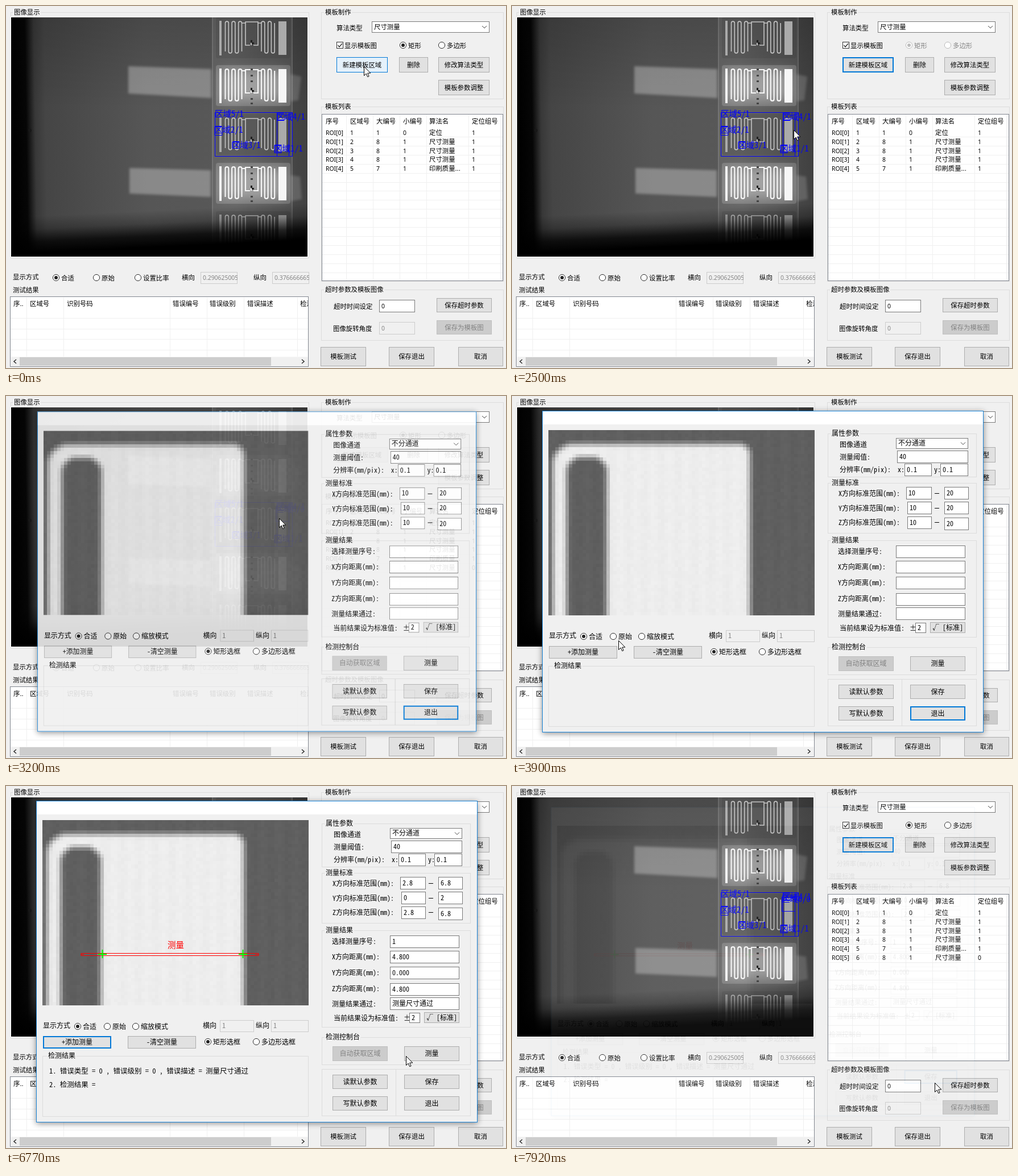
An HTML page with a canvas that plays this animation: 879 by 637 pixels, repeating every 8 s.

```html
<!DOCTYPE html>
<html lang="zh-CN">
<head>
<meta charset="utf-8">
<title>模板制作</title>
<style>
html, body { margin: 0; width: 100%; height: 100%; overflow: hidden; background: #f0f0f0; }
div, svg.layer, canvas { position: absolute; left: 0; top: 0; }
div, svg.layer { width: 879px; height: 637px; }
text { white-space: pre; }
#main text { font: 11.4px "Noto Sans", "Noto Sans CJK SC", "Noto Sans CJK", sans-serif; }
#main text.n { font-size: 10.4px; }
#dialog text, #main text.roi { font: 12px "Noto Sans Mono CJK SC", "Noto Sans CJK SC", "Noto Sans CJK", monospace; }
#main text.roi, #dialog text.big { font-size: 14.5px; }
#dialog text.log { font-size: 12.5px; }
#dialog { transform-origin: 441px 309px; }
#frame { left: 53px; top: 26px; width: 776px; height: 566px; background: #f0f0f0; box-shadow: 0 2px 10px rgba(0,0,0,.45); }
#photo { left: 9px; top: 20px; }
#zoom { left: 64px; top: 60px; width: 468px; height: 326px; image-rendering: pixelated; }
.group { fill: none; stroke: #dcdcdc; }
.b { fill: #e1e1e1; stroke: #adadad; }
.b.off { fill: #ccc; stroke: #bfbfbf; }
.b.hot { fill: #e5f1fb; stroke: #0078d7; }
.b.down { fill: #cce4f7; stroke: #005499; }
/* The button's own viewport clips this to two inner pixels. */
.b.focus { stroke: #0078d7; stroke-width: 3; }
.gray text, text.gray { fill: #838383; }
.ring { fill: #fff; stroke: #333; }
.gray .ring { stroke: #bcbcbc; }
.dot { fill: #222; }
.gray .dot { fill: #bcbcbc; }
.roi { fill: #00f; }
.box { fill: none; stroke: #00f; }
.grid { fill: none; stroke: #f0f0f0; }
.mark { fill: none; stroke: red; }
</style>
</head>
<body>
<div id="main"><canvas id="photo" width="521" height="421"></canvas><svg class="layer"></svg></div>
<div id="dialog"><div id="frame"></div><canvas id="zoom" width="78" height="54"></canvas><svg class="layer"></svg></div>
<svg class="layer"><path id="cursor" d="M0 0V16L3.7 12.5 6.2 18.2 8.6 17.2 6.2 11.6H11.3Z" fill="#fff" stroke="#000"/></svg>
<script>
const $ = id => document.getElementById(id);

// Markup helpers; text is placed by its vertical centre.
const text = (x, cy, s, cls = '', extra = '') =>
  `<text x="${x}" y="${cy + 4.2}" class="${cls}" ${extra}>${s}</text>`;
const rect = (x, y, w, h, attr) =>
  `<rect x="${x + .5}" y="${y + .5}" width="${w - 1}" height="${h - 1}" ${attr}/>`;
const path = (d, attr) => `<path d="${d}" ${attr}/>`;
const part = (id, body) => `<g id="${id}">${body}</g>`;
const view = (x, y, w, h, body) => `<svg x="${x}" y="${y}" width="${w}" height="${h}">${body}</svg>`;

function group(x, y, w, h, label = '', lx = x + 7, unit = 12) {
  const gap = label ? `M${lx - 2} ${y + .5}h${label.length * unit + 4}` : '';
  return rect(x, y, w, h, 'class="group"') +
    (label ? path(gap, 'stroke="#f0f0f0" stroke-width="3"') + text(lx, y, label) : '');
}
function button(x, y, w, h, label, id = '', off = false) {
  return view(x, y, w, h, rect(0, 0, w, h, `class="b ${off ? 'off' : ''}" id="${id}"`) +
    text(w / 2, h / 2, label, off ? 'gray' : '', 'text-anchor="middle"'));
}
function field(x, y, w, h, before = '', after = before, off = false) {
  const cls = off ? 'gray n' : 'n';
  const body = before === after ? text(4, h / 2 - .5, before, cls)
    : text(4, h / 2 - .5, before, cls + ' before') + text(4, h / 2 - .5, after, cls + ' after');
  return view(x, y, w, h, rect(0, 0, w, h, off ? 'fill="#f0f0f0" stroke="#ccc"' : 'fill="#fff" stroke="#7a7a7a"') + body);
}
function radio(x, cy, label, on = false) {
  return `<circle cx="${x}" cy="${cy}" r="5.6" class="ring"/>` +
    (on ? `<circle cx="${x}" cy="${cy}" r="3" class="dot"/>` : '') + text(x + 9, cy + .5, label);
}
function combo(x, y, w, h, label) {
  return rect(x, y, w, h, 'fill="#fff" stroke="#7a7a7a"') + text(x + 4, y + h / 2 - .5, label) +
    path(`M${x + w - 13} ${y + h / 2 - 2}l4 4 4-4`, 'fill="none" stroke="#444"');
}
const columns = (xs, y0, y1) => xs.map(x => `M${x + .5} ${y0}V${y1}`).join('');
const lines = (x0, x1, y, step, n) =>
  Array.from({length: n}, (_, i) => `M${x0} ${Math.round(y + i * step) + .5}H${x1}`).join('');

function mainMarkup() {
  const xs = [562, 605, 651, 698, 744, 819];
  const row = (vals, i) => vals.map((v, c) =>
    text(xs[c], 222.5 + i * 15.9, v, c === 4 ? '' : 'n')).join('');
  const rows = [
    ['1', '1', '0', '定位', '1'], ['2', '8', '1', '尺寸测量', '1'], ['3', '8', '1', '尺寸测量', '1'],
    ['4', '8', '1', '尺寸测量', '1'], ['5', '7', '1', '印刷质量...', '1'], ['6', '8', '1', '尺寸测量', '0']
  ].map((r, i) => row([`ROI[${i}]`, ...r], i));
  const heads = ['序号', '区域号', '大编号', '小编号', '算法名', '定位组号'];
  const tests = [[13, '序..'], [42, '区域号'], [107, '识别号码'], [293, '错误编号'], [358, '错误级别'], [424, '错误描述']];
  const labels = [[367, 190, 5], [366, 218, 2], [397, 245, 3], [475, 195, 4], [471, 251, 1]];

  return group(8, 11, 525, 433, '图像显示', 14, 11.4) + rect(8, 19, 523, 423, 'fill="none" stroke="#fff"') +
    labels.map(([x, y, n]) => text(x, y + 1, `区域${n}/1`, 'roi')).join('') +
    path('M367.5 187.5H503.5V265M367.5 187.5V264.5H498M476.5 188V265M497.5 188V265M476 264.5H504' +
      'M367 212.5h13v15h-13zM398 239.5h12v11h-12zM472 245.5h12v13h-12zM477 190.5h12v11h-12z', 'class="box"') +
    part('region', text(474, 200, '区域6/0', 'roi') + rect(474, 195, 24, 26, 'class="box"')) +
    group(554, 11, 321, 153, '模板制作', 561, 11.4) + text(581, 38.5, '算法类型') + combo(643, 27, 207, 20, '尺寸测量') +
    rect(581, 63, 12, 12, 'fill="#fff" stroke="#333"') + path('M583.5 69l2.5 3 5-6', 'fill="none" stroke="#222" stroke-width="1.2"') +
    text(595, 69.5, '显示模板图') + part('shape', radio(698, 69, '矩形', true) + radio(766, 69, '多边形')) +
    button(581, 90, 90, 27, '新建模板区域', 'create') + button(691, 90, 51, 27, '删除') +
    button(760, 90, 90, 27, '修改算法类型') + button(760, 130, 90, 27, '模板参数调整') +
    group(554, 177, 321, 308, '模板列表', 561, 11.4) + rect(555, 190, 319, 294, 'fill="#fff" stroke="#828790"') +
    path(columns([598, 645, 692, 739, 813, 869], 191, 483) + lines(556, 873, 230, 15.9, 16), 'class="grid"') +
    heads.map((h, i) => text(xs[i], 203, h)).join('') +
    rows.slice(0, 5).join('') + part('row', rows[5]) +
    group(554, 499, 321, 90, '超时参数及模板图像', 561, 11.4) +
    text(576, 529, '超时时间设定') + field(656, 517, 63, 22, '0') + button(757, 514, 97, 25, '保存超时参数') +
    text(575, 568, '图像旋转角度') + field(656, 556, 63, 22, '0', '0', true) + button(757, 553, 97, 25, '保存为模板图', '', true) +
    button(553, 600, 80, 34, '模板测试') + button(673, 600, 80, 34, '保存退出') + button(795, 600, 79, 34, '取消') +
    text(12, 477, '显示方式') + radio(88, 478, '合适', true) + radio(159, 478, '原始') + radio(232, 478, '设置比率') +
    text(309, 478, '横向') + field(342, 468, 65, 21, '0.290625005', '0.290625005', true) +
    text(435, 478, '纵向') + field(468, 468, 65, 21, '0.376666665', '0.376666665', true) +
    text(12, 500, '测试结果') + rect(7, 511, 525, 124, 'fill="#fff" stroke="#828790"') +
    path(columns([36, 101, 288, 353, 418, 512], 513, 617) + lines(8, 531, 549, 18.6, 4), 'class="grid"') +
    tests.map(([x, s]) => text(x, 524, s)).join('') + view(515, 512, 16, 24, text(2, 12, '检测')) +
    rect(8, 617, 523, 17, 'fill="#f0f0f0"') + '<rect x="24" y="618" width="442" height="15" fill="#cdcdcd"/>' +
    path('M18 622l-4 3.5 4 3.5M520 622l4 3.5-4 3.5', 'fill="none" stroke="#333" stroke-width="1.6"');
}

function dialogMarkup() {
  const range = (cy, axis, x, y, y2, lo, hi) => text(574, cy, axis + '方向标准范围(mm):') +
    field(x, y, 738 - x, 22, '10', lo) + path(`M743 ${cy - .5}h8`, 'stroke="#000"') + field(760, y2, 43, 22, '20', hi);
  const result = (cy, y, label, value) => text(573, cy, label) + field(675, y, 122, 22, '', value);

  return rect(53, 26, 776, 566, 'fill="none" stroke="#1883d7"') + '<rect x="54" y="27" width="774" height="23" fill="#fff"/>' +
    part('plus', path('M131 298.5h7M134.5 295v7', 'class="mark"')) +
    part('measure', path('M132 294.5h312v4h-312zM132 296.5h5M438 296.5h6', 'class="mark"')) +
    part('found', text(284, 281, '测量', 'big', 'fill="red"') +
      path('M162 296h15M169.5 288v15M409 296h15M416.5 288v15', 'stroke="#0f0" stroke-width="2"') +
      text(76, 502, '1. 错误类型 = 0 , 错误级别 = 0 , 错误描述 = 测量尺寸通过', 'log') + text(76, 526, '2. 检测结果 =', 'log')) +
    group(555, 66, 262, 77, '属性参数') + text(576, 86, '图像通道') + combo(675, 74, 127, 19, '不分通道') +
    text(576, 108, '测量阈值:') + field(677, 96, 125, 22, '40') +
    text(576, 130, '分辨率(mm/pix):') + text(678, 130, 'x:') + field(690, 119, 48, 22, '0.1') +
    text(742, 130, 'y:') + field(753, 119, 49, 22, '0.1') +
    group(555, 153, 262, 89, '测量标准') +
    range(172, 'X', 693, 160, 160, '2.8', '6.8') + range(198, 'Y', 695, 186, 186, '0', '2') + range(223, 'Z', 695, 212, 214, '2.8', '6.8') +
    group(555, 254, 262, 171, '测量结果') +
    result(274, 263, '选择测量序号:', '1') + result(301, 290, 'X方向距离(mm):', '4.800') +
    result(329, 318, 'Y方向距离(mm):', '0.000') + result(357, 347, 'Z方向距离(mm):', '4.800') +
    result(384, 372, '测量结果通过:', '测量尺寸通过') +
    text(576, 409, '当前结果设为标准值:') + text(699, 409, '±') + field(709, 399, 19, 18, '2') + button(735, 398, 62, 19, '√ [标准]') +
    group(555, 442, 262, 49, '检测控制台') + button(574, 458, 97, 26, '自动获取区域', '', true) + button(700, 458, 97, 26, '测量') +
    group(555, 498, 131, 83) + group(685, 498, 132, 83) +
    button(574, 508, 97, 25, '读默认参数') + button(700, 508, 97, 25, '保存', 'save') +
    button(574, 546, 97, 25, '写默认参数') + button(700, 546, 97, 25, '退出', 'exit') +
    text(65, 422, '显示方式') + radio(126, 423, '合适', true) + radio(178, 423, '原始') + radio(228, 423, '缩放模式') +
    text(346, 422, '横向') + field(376, 412, 60, 21, '1', '1', true) + text(439, 422, '纵向') + field(466, 412, 66, 21, '1', '1', true) +
    button(65, 440, 120, 22, '+添加测量', 'add') + button(214, 440, 120, 22, '-清空测量') +
    radio(355, 450, '矩形选框', true) + radio(440, 450, '多边形选框') +
    group(64, 475, 468, 107, '检测结果', 74);
}

function antenna(c, cy, bright) {
  const tone = bright ? '#f6f6f6' : '#c4c4c4';
  c.fillStyle = bright ? 'rgba(255,255,255,.16)' : 'rgba(0,0,0,.08)';
  c.beginPath(); c.roundRect(369, cy - 36, 131, 72, 4); c.fill();
  if (bright) {
    c.filter = 'blur(9px)'; c.fillStyle = 'rgba(255,255,255,.3)';
    c.fillRect(378, cy - 26, 114, 52); c.filter = 'none';
  }
  c.fillStyle = bright ? tone : '#aaa';
  c.fillRect(375, cy - 30, 4, 61);
  c.fillRect(479, cy - 29, 14, 59);
  c.strokeStyle = tone; c.lineWidth = bright ? 2.2 : 1.6;
  const snake = (x, n) => {
    c.beginPath(); c.moveTo(x, cy + 24);
    for (let i = 0; i < n; i++) {
      const up = i % 2 === 0, end = cy + (up ? -26 : 24);
      c.lineTo(x, end);
      if (i < n - 1) c.arc(x + 2.9, end, 2.9, Math.PI, 0, !up);
      x += 5.8;
    }
    c.stroke();
  };
  snake(385.5, 6); snake(449, 5);
  // Loop around the chip, with feeds to both meanders.
  c.beginPath();
  c.moveTo(429, cy + 13); c.lineTo(421, cy + 13); c.lineTo(421, cy - 28);
  c.lineTo(443, cy - 28); c.lineTo(443, cy + 13); c.lineTo(435, cy + 13);
  c.moveTo(414.5, cy - 26); c.lineTo(421, cy - 26); c.moveTo(443, cy - 26); c.lineTo(449, cy - 26);
  c.stroke();
  c.fillStyle = '#222'; c.fillRect(430, cy + 4, 3, 4); c.fillRect(432, cy + 8, 4, 3);
  c.fillStyle = tone; c.fillRect(430, cy + 9, 2, 4);
  if (bright) {
    c.fillStyle = '#444';
    for (const dy of [-30, -19, -9, 22, 30]) c.fillRect(430, cy + dy, 4, 3);
  }
}

function drawPhoto() {
  const c = $('photo').getContext('2d');
  const fade = (x0, y0, x1, y1, stops) => {
    const g = c.createLinearGradient(x0, y0, x1, y1);
    for (const [p, col] of stops) g.addColorStop(p, col);
    c.fillStyle = g; c.fillRect(9, 20, 521, 421);
  };
  c.translate(-9, -20);
  fade(9, 0, 530, -8, [[0, '#000'], [.045, '#060606'], [.075, '#383838'], [.11, '#454545'], [.45, '#565656'], [.75, '#585858'], [1, '#404040']]);
  fade(0, 20, 0, 180, [[0, 'rgba(0,0,0,.16)'], [1, 'rgba(0,0,0,0)']]);
  c.fillStyle = 'rgba(255,255,255,.08)'; c.fillRect(362, 20, 142, 421);
  c.fillStyle = 'rgba(255,255,255,.1)'; c.fillRect(362, 20, 2, 421); c.fillRect(502, 20, 2, 421);
  const patch = (pts, a) => {
    c.filter = 'blur(2px)'; c.fillStyle = `rgba(255,255,255,${a})`;
    c.beginPath(); pts.forEach(p => c.lineTo(...p)); c.fill(); c.filter = 'none';
  };
  patch([[215, 106], [361, 111], [361, 162], [215, 154]], .3);
  patch([[217, 285], [360, 289], [360, 336], [217, 330]], .3);
  patch([[500, 120], [519, 124], [514, 166], [500, 168]], .16);
  patch([[500, 298], [517, 300], [520, 340], [500, 344]], .16);
  [[56, 0], [140, 1], [226, 0], [312, 1], [397, 0]].forEach(a => antenna(c, ...a));
  c.fillStyle = '#181818'; c.beginPath(); c.arc(42, 219, 3, 0, 7); c.fill();
  fade(0, 372, 3, 436, [[0, 'rgba(0,0,0,0)'], [.35, 'rgba(0,0,0,.25)'], [.7, 'rgba(0,0,0,.8)'], [1, '#000']]);
}

// Coarse magnified pixels shaded from rounded-box distances.
function drawZoom() {
  const c = $('zoom').getContext('2d');
  const cover = (x, y, x0, x1, y0, r, soft) => {
    const dx = Math.max(x0 - x, x - x1) + r, dy = y0 - y + r;
    const d = Math.min(Math.max(dx, dy), 0) + Math.hypot(Math.max(dx, 0), Math.max(dy, 0)) - r;
    const k = Math.min(1, Math.max(0, .5 - d / soft));
    return k * k * (3 - 2 * k);
  };
  let seed = 7;
  const rnd = () => (seed = seed * 16807 % 2147483647) / 2147483647 - .5;
  for (let j = 0; j < 54; j++) for (let i = 0; i < 78; i++) {
    const x = 67 + i * 6, y = 63 + j * 6.04;
    const pad = cover(x, y, 72, 418, 85, x < 250 ? 36 : 19, 19);
    const slot = cover(x, y, 96, 167, 108, 27, 18);
    const grain = rnd() * 4 + Math.sin(i * 1.3) * 1.5;
    const v = Math.round(95 + 142 * pad * (1 - slot) + grain);
    c.fillStyle = `rgb(${v},${v},${v})`; c.fillRect(i, j, 1, 1);
  }
}

// Cursor moves: start, end, steps, x, y.
const moves = [
  [970, 1430, 7, 480, 206], [1580, 1720, 3, 475, 196], [1890, 2270, 6, 498, 220], [2500, 2580, 2, 491, 215],
  [3110, 3200, 2, 480, 215], [3280, 3760, 7, 190, 428], [3840, 4210, 6, 146, 455], [4380, 4820, 7, 134, 298],
  [4990, 5070, 2, 297, 303], [5150, 5510, 6, 441, 294], [6460, 6760, 5, 703, 475], [6840, 7250, 6, 743, 522]
];
// Dialog poses: time, scale, opacity.
const poses = [[0, 1, 0], [3030, .961, .15], [3110, .985, .6], [3200, .995, .9], [3280, 1, 1],
  [7770, .985, .6], [7850, .97, .25], [7920, .96, .06]];
const looks = {
  create: [[0, 'hot'], [500, 'down'], [660, 'hot focus'], [1050, 'focus'], [3030, ''], [7770, 'focus']],
  exit: [[0, 'focus'], [4210, '']],
  add: [[0, ''], [3990, 'hot'], [4210, 'down focus'], [4380, 'hot focus'], [4530, 'focus'], [7610, '']],
  save: [[0, ''], [7090, 'hot'], [7320, 'down'], [7610, 'hot focus']]
};
const spans = { region: [2890, 8000], row: [3030, 8000], plus: [4820, 5680], measure: [5680, 8000], found: [5990, 8000] };
const at = (table, t) => table.filter(r => r[0] <= t).pop();

function cursorAt(t) {
  let x = 629, y = 106;
  for (const [t0, t1, n, tx, ty] of moves) {
    if (t < t0) break;
    const step = Math.floor((t - t0) / (t1 - t0) * (n - 1) + 1e-6) + 1;
    const p = Math.min(1, step / n), k = p * p * (3 - 2 * p);
    x += (tx - x) * k; y += (ty - y) * k;
  }
  return [x, y];
}

function render(t) {
  $('cursor').setAttribute('transform', `translate(${cursorAt(t).map(v => Math.round(v) + .5)})`);
  const [, scale, alpha] = at(poses, t);
  $('dialog').style.transform = scale === 1 ? 'none' : `scale(${scale})`;
  $('dialog').style.opacity = alpha;
  for (const id in looks) $(id).setAttribute('class', 'b ' + at(looks[id], t)[1]);
  for (const id in spans) $(id).style.display = t >= spans[id][0] && t < spans[id][1] ? '' : 'none';
  $('shape').setAttribute('class', t >= 660 && t < 3030 ? 'gray' : '');
  const done = t >= 5990;
  before.forEach(e => e.style.display = done ? 'none' : '');
  after.forEach(e => e.style.display = done ? '' : 'none');
}

document.querySelector('#main svg').innerHTML = mainMarkup();
document.querySelector('#dialog svg').innerHTML = dialogMarkup();
const before = document.querySelectorAll('.before'), after = document.querySelectorAll('.after');
drawPhoto();
drawZoom();
const start = performance.now();
function tick() {
  render((performance.now() - start) % 8000);
  requestAnimationFrame(tick);
}
tick();
</script>
</body>
</html>
```
